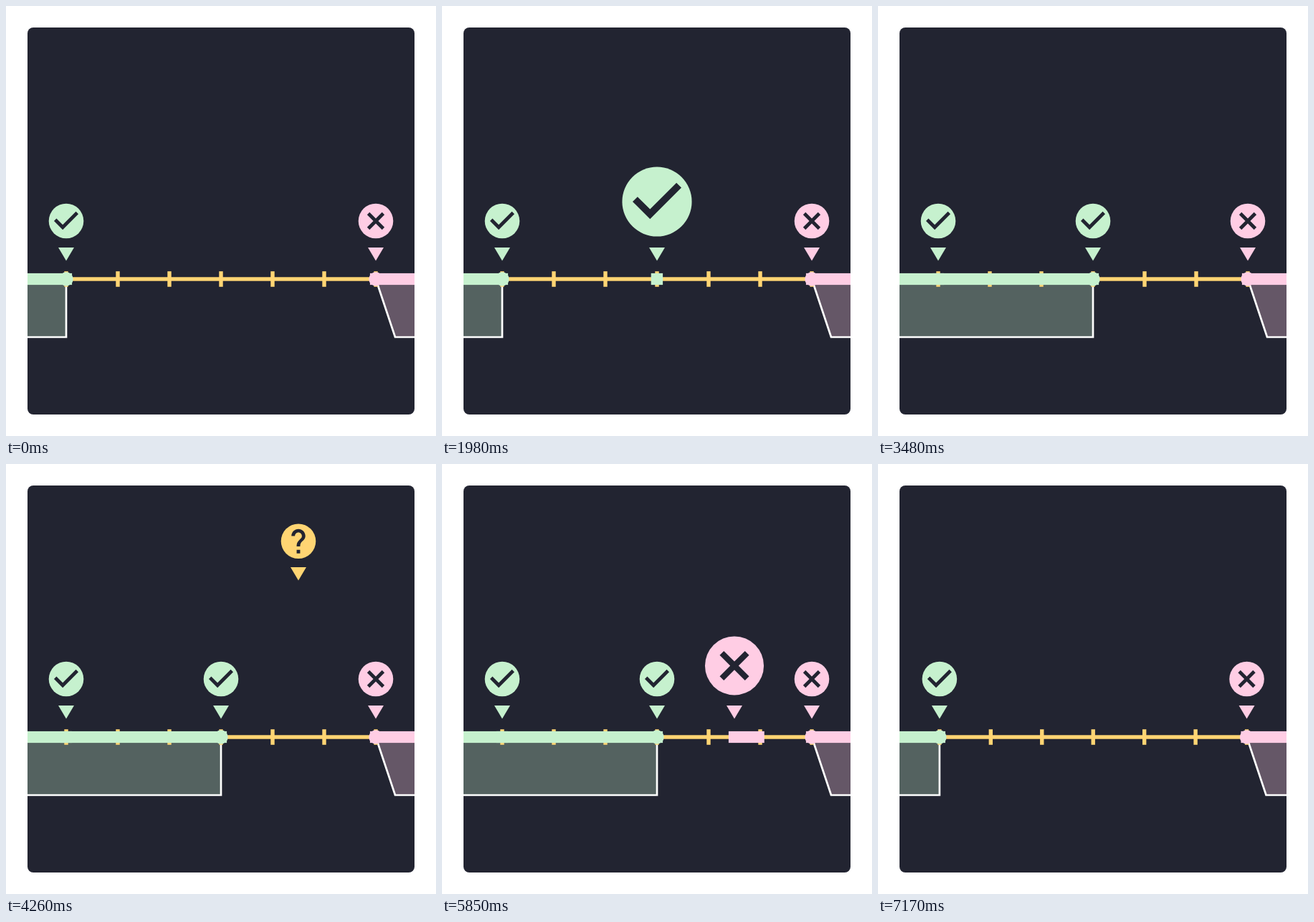
These frames come from a looping animation (600 by 600 pixels, 7200 ms). An HTML page with a canvas:

```html
<!DOCTYPE html>
<html lang="en">
<head>
<meta charset="utf-8">
<style>
  html, body { margin: 0; width: 100%; height: 100%; overflow: hidden; background: #fff; }
  canvas { display: block; width: 600px; height: 600px; }
</style>
</head>
<body>
<canvas id="stage" width="600" height="600"></canvas>
<script>
const ctx = document.getElementById('stage').getContext('2d');
const LOOP = 7200;
const CARD = '#222431';
const GREEN = [198, 241, 206], PINK = [255, 205, 228], YELLOW = [255, 213, 115];
const AXIS_Y = 381, FLOOR_Y = 462, LEFT = 84, RIGHT = 516;
const BAR = 16.2, TICK = 5.4, ICON_R = 24.3, DOT_R = 9.72;

// Glyphs live on a 24 unit grid
const GLYPHS = {
  check: new Path2D('M10 17l-5-5 1.41-1.41L10 14.17l7.59-7.59L19 8z'),
  cross: new Path2D('M17 15.59L15.59 17 12 13.41 8.41 17 7 15.59 10.59 12 7 8.41 8.41 7 12 10.59 15.59 7 17 8.41 13.41 12z'),
  question: new Path2D('M13 19h-2v-2h2zM15.07 11.25l-.9.92C13.45 12.9 13 13.5 13 15h-2v-.5c0-1.1.45-2.1 1.17-2.83l1.24-1.26c.37-.36.59-.86.59-1.41 0-1.1-.9-2-2-2s-2 .9-2 2H8c0-2.21 1.79-4 4-4s4 1.79 4 4c0 .88-.36 1.68-.93 2.25z')
};

const PROBES = [
  { value: 3, known: 0, start: 435, color: GREEN, glyph: 'check' },
  { value: 4.5, known: 6, start: 4035, color: PINK, glyph: 'cross' }
];

const lerp = (a, b, p) => a + (b - a) * p;
const span = (t, from, to) => Math.min(1, Math.max(0, (t - from) / (to - from)));
const quad = p => p < .5 ? 2 * p * p : 1 - 2 * (1 - p) ** 2;
const cubic = p => p < .5 ? 4 * p ** 3 : 1 - 4 * (1 - p) ** 3;
const rgb = (c, a = 1) => `rgba(${c.map(Math.round).join()},${a})`;
const mix = (a, b, p) => a.map((v, i) => lerp(v, b[i], p));

function disc(x, y, r, color) {
  ctx.fillStyle = rgb(color);
  ctx.beginPath();
  ctx.arc(x, y, r, 0, Math.PI * 2);
  ctx.fill();
}

function drawGlyph(name, alpha) {
  if (alpha <= 0) return;
  ctx.globalAlpha = alpha;
  ctx.fillStyle = CARD;
  ctx.fill(GLYPHS[name]);
  ctx.globalAlpha = 1;
}

function drawMarker(x, color, glyph, { iconY = 300, tipY = 0, scale = 1, known = 1 } = {}) {
  ctx.fillStyle = rgb(color);
  ctx.beginPath();
  ctx.moveTo(x - 11, 337 + tipY);
  ctx.lineTo(x + 11, 337 + tipY);
  ctx.lineTo(x, 355.5 + tipY);
  ctx.fill();

  disc(x, iconY, ICON_R * scale, color);
  const unit = ICON_R / 10 * scale;
  ctx.save();
  ctx.translate(x, iconY);
  ctx.scale(unit, unit);
  ctx.translate(-12, -12);
  drawGlyph('question', 1 - known);
  drawGlyph(glyph, known);
  ctx.restore();
}

function drawProbe(probe, x, t) {
  const u = t - probe.start;
  if (u < 0) return;
  const fall = quad(span(u, 0, 500)), rebound = quad(span(u, 500, 735));
  const reveal = cubic(span(u, 750, 1490)), settle = cubic(span(u, 1500, 2240));
  const drop = (low, high) => lerp(lerp(-330, low, fall), high, rebound);
  const lift = u < 750 ? drop(7, -6) : lerp(lerp(-6, -27, reveal), 0, settle);
  const tipY = u < 750 ? drop(5.5, -1) : lerp(-1, 0, reveal);
  drawMarker(x, mix(YELLOW, probe.color, reveal), probe.glyph, {
    iconY: 300 + lift, tipY, scale: 1 + reveal - settle, known: reveal
  });
}

function drawBar(from, to, color, size = BAR) {
  ctx.fillStyle = rgb(color);
  const a = Math.min(from, to), b = Math.max(from, to);
  ctx.fillRect(a - size / 2, AXIS_Y - size / 2, b - a + size, size);
}

function drawProbeBar(probe, toX, t) {
  const u = t - probe.start;
  const pop = cubic(span(u, 750, 1490));
  if (pop <= 0) return;
  const reach = lerp(probe.value, probe.known, cubic(span(u, 1500, 2240)));
  drawBar(toX(reach), toX(probe.value), probe.color, BAR * pop);
}

function drawRegion(x, slant, outer, color) {
  ctx.beginPath();
  ctx.moveTo(outer, AXIS_Y);
  ctx.lineTo(x, AXIS_Y);
  ctx.lineTo(x + slant, FLOOR_Y);
  ctx.lineTo(outer, FLOOR_Y);
  ctx.closePath();
  ctx.fillStyle = rgb(color, .3);
  ctx.fill();
  ctx.strokeStyle = '#fff';
  ctx.lineWidth = 2.7;
  ctx.stroke();
}

function drawAxis(toX, growth) {
  ctx.fillStyle = rgb(YELLOW);
  const start = toX(0);
  ctx.fillRect(start, AXIS_Y - TICK / 2, toX(6) - start, TICK);
  for (let i = 0; i <= 24; i++) {
    const half = i % 4 ? lerp(TICK / 2, 10.8, growth) : 10.8;
    if (i % 4 && growth === 0) continue;
    ctx.fillRect(toX(i / 4) - TICK / 2, AXIS_Y - half, TICK, half * 2);
  }
}

function draw(t) {
  const low = lerp(0, 3, quad(span(t, 6325, 7200)));
  const high = lerp(6, 4.5, quad(span(t, 6354, 7206)));
  const toX = v => LEFT + (RIGHT - LEFT) * (v - low) / (high - low);
  const goodX = toX(lerp(0, 3, cubic(span(t, 2690, 3460))));
  const badX = toX(lerp(6, 4.5, cubic(span(t, 6300, 7062))));

  ctx.clearRect(0, 0, 600, 600);
  ctx.save();
  ctx.beginPath();
  ctx.roundRect(30, 30, 540, 540, 8.1);
  ctx.fillStyle = CARD;
  ctx.fill();
  ctx.clip();

  drawRegion(goodX, 0, -20, GREEN);
  drawRegion(badX, 27, 1200, PINK);
  drawAxis(toX, quad(span(t, 6310, 7180)));
  drawBar(-900, toX(0), GREEN);
  drawBar(toX(6), 1500, PINK);
  PROBES.forEach(p => drawProbeBar(p, toX, t));
  disc(goodX, AXIS_Y, DOT_R, GREEN);
  disc(badX, AXIS_Y, DOT_R, PINK);

  drawMarker(toX(0), GREEN, 'check');
  drawMarker(toX(6), PINK, 'cross');
  PROBES.forEach(p => drawProbe(p, toX(p.value), t));
  ctx.restore();
}

function tick() {
  draw(performance.now() % LOOP);
  requestAnimationFrame(tick);
}
tick();
</script>
</body>
</html>
```
